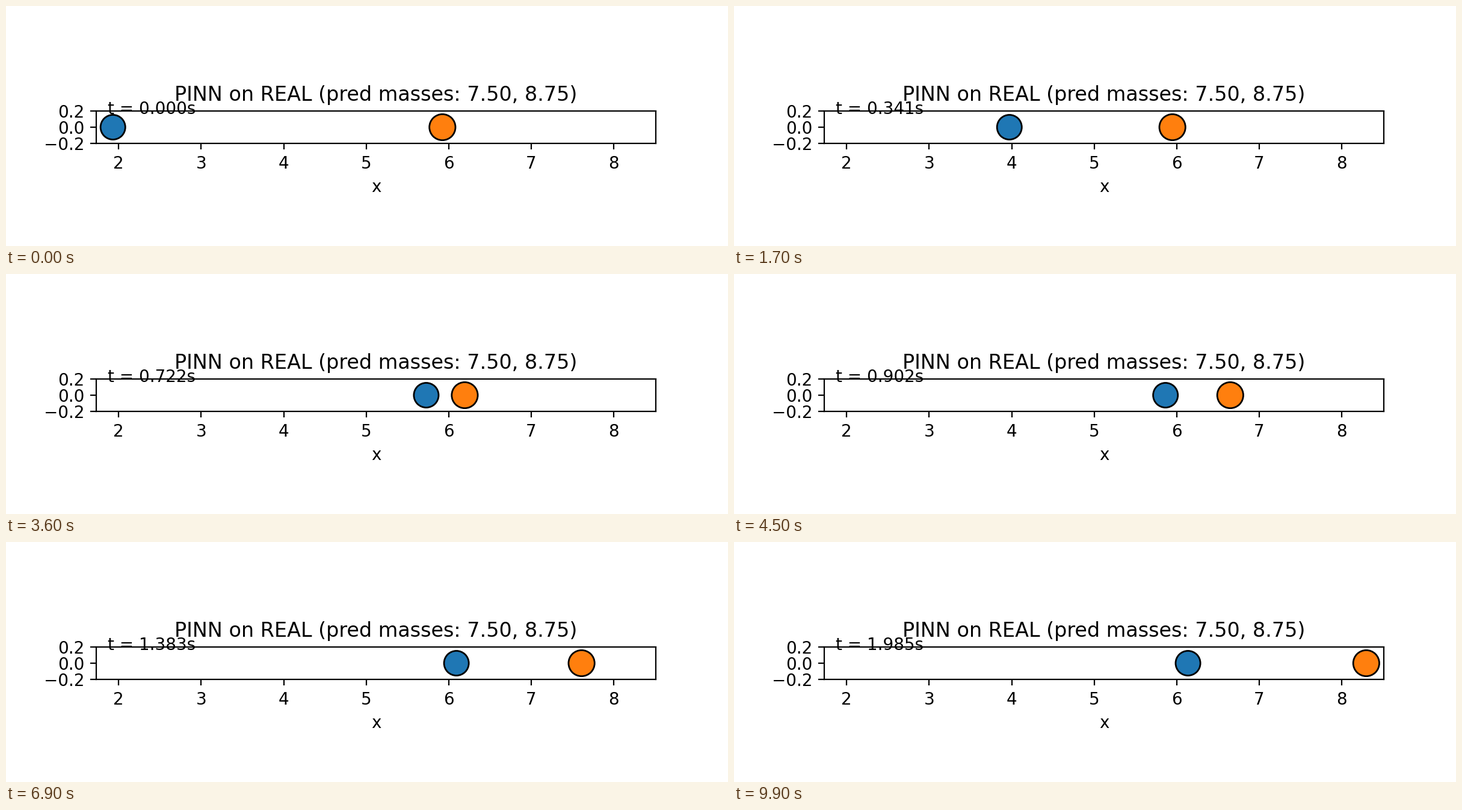
These frames come from a looping animation (1200 by 400 pixels, 10 s). A matplotlib script:

```python
import numpy as np
import matplotlib.pyplot as plt
from matplotlib.animation import FuncAnimation
from matplotlib.patches import Circle

FRAMES = 100
MASSES = (7.50, 8.75)
COLORS = ("tab:blue", "tab:orange")
HIT = 0.62  # moment of the collision, in seconds

# One time sample in four of a 400-point grid over two seconds
times = np.linspace(0, 2, 400)[::4]


def glide(t, x_stop, t_stop, friction):
    """Slide under constant friction, coming to rest at x_stop."""
    return x_stop - friction / 2 * np.maximum(t_stop - t, 0) ** 2


def soft_min(a, b, width):
    return -width * np.logaddexp(-a / width, -b / width)


def striker(t):
    """Steady approach, then a slow slide after the hit."""
    return soft_min(1.93 + 5.99 * t, glide(t, 6.136, 1.703, 0.85), 0.02)


def resting(t):
    """Growing ripple around the rest position, then pushed away."""
    s = t / HIT
    ripple = 0.126 * s * np.sin(2 * np.pi * s ** 1.36)
    return np.where(t < HIT, 5.923 + ripple, glide(t, 8.437, 2.407, 1.58))


paths = (striker(times), resting(times))

plt.rcParams["font.family"] = "DejaVu Sans"
fig, ax = plt.subplots(figsize=(6, 2), dpi=200)
ax.set_xlim(1.728, 8.509)
ax.set_ylim(-0.2, 0.2)
ax.set_yticks([-0.2, 0.0, 0.2])
ax.set_aspect("equal")
ax.set_xlabel("x")
ax.set_title("PINN on REAL (pred masses: {:.2f}, {:.2f})".format(*MASSES))

balls = [
    ax.add_patch(Circle((path[0], 0), 0.15 * np.cbrt(mass / MASSES[0]),
                        facecolor=color, edgecolor="black", linewidth=1))
    for path, mass, color in zip(paths, MASSES, COLORS)
]
clock = ax.text(0.02, 0.9, "", transform=ax.transAxes)


def update(step):
    for ball, path in zip(balls, paths):
        ball.center = (path[step], 0)
    clock.set_text(f"t = {times[step]:.3f}s")
    return [*balls, clock]


anim = FuncAnimation(fig, update, frames=FRAMES, interval=100,
                     repeat=True, repeat_delay=0)
plt.show()
```
